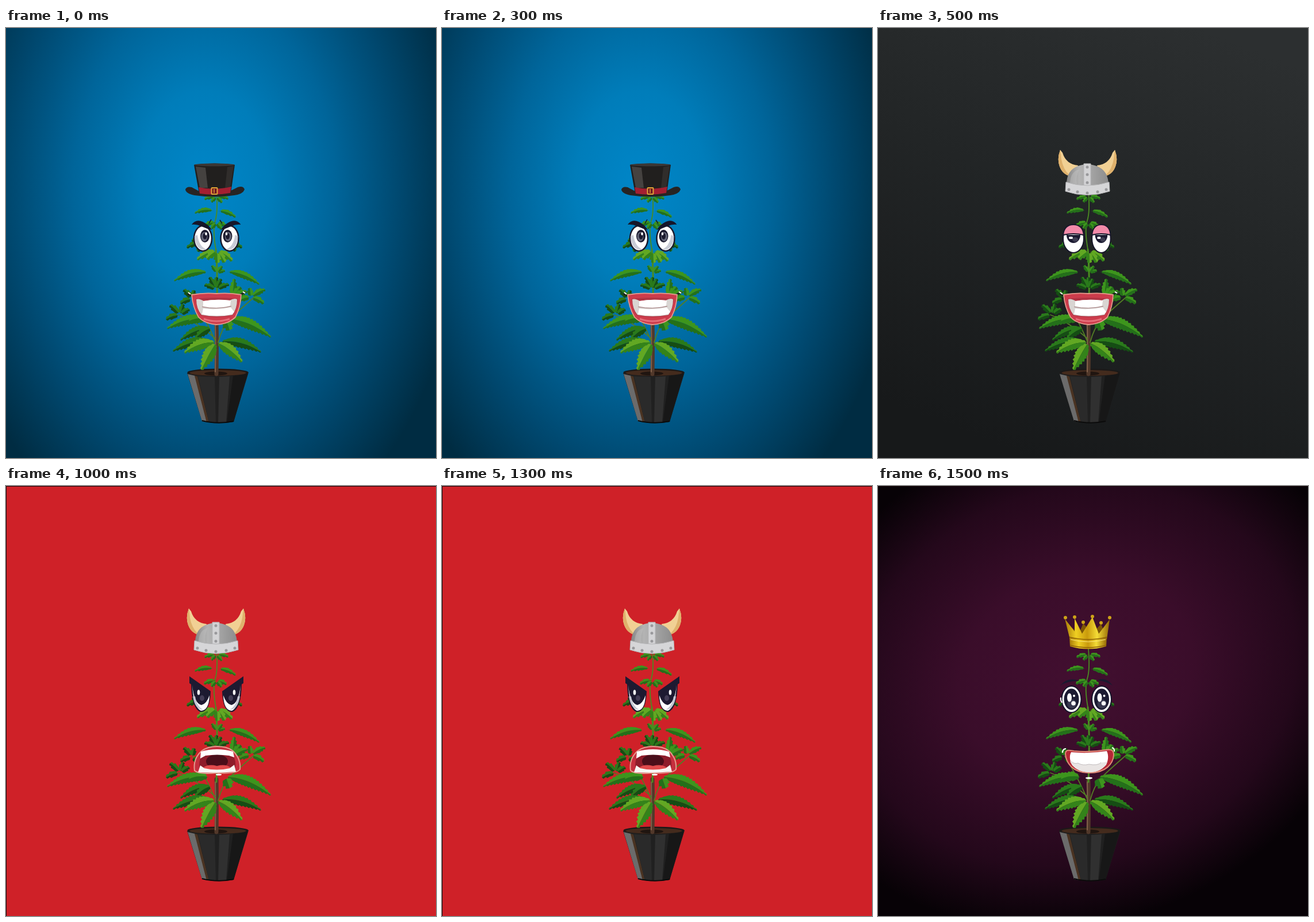
Animation of 748x748 px, one loop 2 s. Source, as an HTML page:

```html
<!DOCTYPE html>
<html lang="en">
<head>
<meta charset="utf-8">
<title>Plant with changing faces</title>
<style>
  html, body { margin: 0; width: 100%; height: 100%; overflow: hidden; background: #000; }
  svg { display: block; width: 748px; height: 748px; }
  [data-scenes] { visibility: hidden; }
  [data-scenes].on { visibility: visible; }
</style>
</head>
<body>
<svg viewBox="0 0 748 748">
  <defs>
    <radialGradient id="blue" gradientUnits="userSpaceOnUse" cx="0" cy="0" r="1" gradientTransform="translate(345 275) scale(455 660)">
      <stop offset="0" stop-color="#0086c8"/><stop offset=".25" stop-color="#007dba"/>
      <stop offset=".5" stop-color="#00659a"/><stop offset=".75" stop-color="#00486f"/>
      <stop offset="1" stop-color="#002c42"/>
    </radialGradient>
    <linearGradient id="slate" x1=".75" y1="0" x2=".35" y2="1">
      <stop offset="0" stop-color="#2c2f30"/><stop offset=".45" stop-color="#222526"/><stop offset="1" stop-color="#17191a"/>
    </linearGradient>
    <radialGradient id="plum" gradientUnits="userSpaceOnUse" cx="0" cy="0" r="1" gradientTransform="translate(345 330) rotate(-20) scale(520 430)">
      <stop offset="0" stop-color="#420f30"/><stop offset=".4" stop-color="#3a0d2a"/>
      <stop offset=".75" stop-color="#24081b"/><stop offset="1" stop-color="#070206"/>
    </radialGradient>
    <linearGradient id="gold">
      <stop offset="0" stop-color="#a87a08"/><stop offset=".25" stop-color="#efcf22"/><stop offset=".5" stop-color="#c99a0c"/>
      <stop offset=".72" stop-color="#f4dc36"/><stop offset="1" stop-color="#946806"/>
    </linearGradient>
    <linearGradient id="steel">
      <stop offset="0" stop-color="#858585"/><stop offset=".3" stop-color="#b4b4b4"/><stop offset="1" stop-color="#8c8c8c"/>
    </linearGradient>
  </defs>

  <rect data-scenes="0" width="748" height="748" fill="url(#blue)"/>
  <rect data-scenes="1" width="748" height="748" fill="url(#slate)"/>
  <rect data-scenes="2" width="748" height="748" fill="#cf2128"/>
  <rect data-scenes="3" width="748" height="748" fill="url(#plum)"/>
  <path data-scenes="23" d="M0 .5H748M.5 0V748" stroke="#160508"/>

  <g id="pot">
    <path d="M315 600L341 684Q368 690 396 685L422 599Z" fill="#202020"/>
    <path d="M316 602L329 605 351 686 341 684Z" fill="#6b6b6b"/>
    <path d="M328 605L333 606 353 686 349 686Z" fill="#4a3322"/>
    <path d="M334 606L363 607 365 687 353 686Z" fill="#2a2a2a"/>
    <path d="M371 607L389 606 383 686 369 687Z" fill="#303030"/>
    <path d="M395 605L421 600 396 685 384 686Z" fill="#171717"/>
    <path d="M341 683Q368 690 396 684" fill="none" stroke="#0b0b0b" stroke-width="2"/>
    <ellipse cx="368.500" cy="599" rx="53" ry="6.500" fill="#1c1918"/>
    <ellipse cx="368.500" cy="600" rx="49" ry="5" fill="#442b1d"/>
    <ellipse cx="365" cy="601" rx="20" ry="3.500" fill="#201510"/>
  </g>
  <g id="stems" fill="none" stroke-linecap="round">
    <path d="M366 602Q367 550 366 510" stroke="#51382a" stroke-width="7"/>
    <path d="M364 598Q365 550 364 515" stroke="#80604a" stroke-width="2"/>
    <path d="M366 515Q369 430 365 385" stroke="#4b8c22" stroke-width="3"/>
    <path d="M365 385Q359 350 364 335T366 283" stroke="#4b8c22" stroke-width="1.800"/>
    <path d="M369 547Q376 520 390 506T432 468M364 545Q352 515 325 470M364 540Q330 510 300 499" stroke="#537d25" stroke-width="1.800"/>
  </g>
  <g id="leaves"></g>

  <!-- top hat -->
  <g data-scenes="0">
    <path d="M327 238L336 288Q364 294 391 288L398 238Q363 233 327 238Z" fill="#211f1e"/>
    <path d="M330 241L347 243 351 278 337 278Z" fill="#454240"/>
    <path d="M385 242L396 240 390 278 381 279Z" fill="#302d2b"/>
    <ellipse cx="362.500" cy="238" rx="35" ry="2.500" fill="#3b3735"/>
    <path d="M312 281Q314 275 323 277L336 284Q364 291 391 283L403 277Q413 274 415 281 412 289 397 291 364 296 328 291 313 288 312 281Z" fill="#272423"/>
    <path d="M335 277Q363 283 392 276L390 287Q363 292 337 288Z" fill="#a31f31"/>
    <rect x="357.500" y="278" width="10" height="11" rx="1" fill="#6f1522" stroke="#dfa436" stroke-width="2"/>
    <path d="M362 280V287" stroke="#dfa436" stroke-width="1.500"/>
  </g>

  <!-- horned helmet -->
  <g data-scenes="12" id="helmet">
    <g id="horn">
      <path d="M317 212Q311 228 316 241 321 255 335 258 346 251 348 239 327 237 321 217Z" fill="#f1d094"/>
      <path d="M317 212Q311 228 316 241 321 255 335 258 322 247 319 228Z" fill="#dfb16c"/>
    </g>
    <use href="#horn" transform="matrix(-1 0 0 1 729 0)"/>
    <path d="M328 274Q327 239 364 237 401 239 401 274Z" fill="url(#steel)"/>
    <path d="M334 270Q335 249 350 246 344 257 346 272Z" fill="#c0c0c0" opacity=".5"/>
    <path d="M358 236H370V280H358Z" fill="#d3d3d5" stroke="#b5b5b7"/>
    <path d="M327 268Q364 280 402 268L403 284Q364 297 326 284Z" fill="#d6d6d8" stroke="#b5b5b7"/>
    <g fill="#99999c" id="rivets"></g>
  </g>

  <!-- crown -->
  <g data-scenes="3">
    <path d="M335 265L331 240 349 258 357 239 373 256 388 240 398 265Z" fill="#7d5606"/>
    <path d="M334 267L325 231 342 253 342 230 355 257 373 228 384 257 403 232 398 267Z" fill="url(#gold)"/>
    <path d="M333 262Q366 270 398 262L397 279Q366 288 334 279Z" fill="url(#gold)"/>
    <path d="M333 263Q366 271 398 263M334 277Q366 285 397 277" fill="none" stroke="#8f6207" stroke-width="1.300"/>
    <path d="M335 267Q366 275 396 267" fill="none" stroke="#ffe87a"/>
    <g id="beads" fill="#cda318"></g>
  </g>

  <!-- glaring eyes -->
  <g data-scenes="0">
    <g id="glare">
      <ellipse cx="342.500" cy="366" rx="15.500" ry="22" fill="#fff" stroke="#1b1a2e" stroke-width="2.500"/>
      <path d="M328 362Q330 389 349 385 336 381 333 360Z" fill="#c9ccd6"/>
      <ellipse cx="346" cy="362" rx="8" ry="11" fill="#1b1a2e"/>
      <ellipse cx="345" cy="363" rx="5.500" ry="8" fill="#656779"/>
      <ellipse cx="346" cy="362" rx="3.500" ry="5.500" fill="#1b1a2e"/>
      <ellipse cx="348" cy="358" rx="1.800" ry="2.800" fill="#fff"/>
      <path d="M323 342Q330 332 342 337 351 341 358 351 348 349 340 345 331 341 323 342Z" fill="#16162a"/>
    </g>
    <use href="#glare" transform="matrix(-1 0 0 1 731.500 0)"/>
    <path d="M353 340L357 333M376 340L372 334" stroke="#16162a" stroke-width="1.500"/>
  </g>

  <!-- sleepy eyes -->
  <g data-scenes="1">
    <g id="sleepy">
      <ellipse cx="340" cy="366.500" rx="18" ry="24.500" fill="#fff" stroke="#17172a" stroke-width="2"/>
      <path d="M328 360A12 14 0 0 0 352 360Z" fill="#1a1930"/>
      <ellipse cx="343" cy="368" rx="5" ry="4" fill="#3d3c51"/>
      <rect x="332" y="363" width="7" height="4" rx="2" fill="#fff"/>
      <path d="M322 360Q324 342 340 342T358 360Q340 356 322 360Z" fill="#f28aa9" stroke="#17172a" stroke-width="2"/>
    </g>
    <use href="#sleepy" transform="translate(82.400 0) scale(.9 1)"/>
  </g>

  <!-- furious eyes -->
  <g data-scenes="2">
    <g id="fury">
      <path d="M319 331L356 357Q355 394 338 393 323 387 322 345L319 343Z" fill="#1d1a31"/>
      <path d="M324 346Q327 378 340 381 349 379 354 364 353 391 339 391 326 385 324 346Z" fill="#fff"/>
      <path d="M325 366Q329 390 343 389 332 384 329 366Z" fill="#c5c7d3"/>
      <ellipse cx="341" cy="369" rx="4" ry="5" fill="#423c55"/>
      <ellipse cx="335" cy="359" rx="2.300" ry="4.500" fill="#fff"/>
    </g>
    <use href="#fury" transform="matrix(-1 0 0 1 732 0)"/>
  </g>

  <!-- sparkling eyes -->
  <g data-scenes="3">
    <g id="sparkle">
      <ellipse cx="336.500" cy="371" rx="17" ry="23" fill="#fff" stroke="#15152a" stroke-width="2"/>
      <ellipse cx="336.500" cy="371" rx="13" ry="18.500" fill="#1b1b32"/>
      <ellipse cx="337" cy="379" rx="8" ry="8" fill="#38384f"/>
      <ellipse cx="333" cy="368" rx="4" ry="7.500" fill="#fff"/>
      <circle cx="340" cy="378" r="3.800" fill="#fff"/>
      <circle cx="341" cy="365" r="2" fill="#fff"/>
    </g>
    <use href="#sparkle" x="52.500"/>
    <path d="M317 347Q331 331 350 339 330 339 317 347ZM382 338Q396 331 408 347 397 340 382 338Z" fill="#1b1a30"/>
    <path d="M318 368Q317 372 320 377" fill="none" stroke="#fff" stroke-width="2"/>
  </g>

  <!-- grin -->
  <g data-scenes="01">
    <path d="M316 462L322 466M408 464L416 459" stroke="#1a241a" stroke-width="3"/>
    <path d="M317 460L321 463M412 459L416 461" stroke="#fff" stroke-width="2"/>
    <path d="M323 464Q345 460 366 462 388 460 409 464 408 486 399 503 387 515 366 516 345 514 335 503 325 486 323 464Z" fill="#cd3c4c" stroke="#e59a8c" stroke-width="1.800"/>
    <path d="M330 471Q366 467 403 471 403 488 394 500 366 506 339 500 330 488 330 471Z" fill="#b03443"/>
    <path d="M331 472Q336 470 344 475 366 471 389 474 397 469 402 472 402 488 394 499 366 504 340 499 331 488 331 472Z" fill="#d9d5d2"/>
    <path d="M343 475Q366 471 391 474L390 483Q366 490 343 484ZM343 488Q366 491 391 486L397 494 393 498Q366 503 341 498Z" fill="#fff"/>
    <path d="M341 485Q366 490 392 484" fill="none" stroke="#a2777a"/>
    <path d="M344 506Q366 514 389 506" fill="none" stroke="#e56d78" stroke-width="3"/>
  </g>

  <!-- roar -->
  <g data-scenes="2">
    <path d="M328 495Q325 475 340 461 351 453 367 453 385 453 395 461 409 475 407 493 401 501 367 499 335 502 328 495Z" fill="#c52f3e" stroke="#e39a8d" stroke-width="2"/>
    <path d="M342 466Q367 458 393 466 402 478 398 493 367 496 337 493 334 478 342 466Z" fill="#8e1c2a"/>
    <ellipse cx="367" cy="479" rx="19" ry="12" fill="#4a0e1a"/>
    <path d="M343 490Q352 483 367 487 382 483 391 490L387 496H347Z" fill="#e04a4c"/>
    <path d="M339 462Q367 454 395 462L397 472 388 469Q367 466 347 469L338 474Z" fill="#fff"/>
    <path d="M334 498L338 486 345 491Q367 496 389 491L397 485 400 497Q367 500 334 498Z" fill="#f8f7f4"/>
    <ellipse cx="370" cy="502" rx="5" ry="1.500" fill="#fff"/>
  </g>

  <!-- toothy smile -->
  <g data-scenes="3">
    <path d="M321 464Q321 457 327 457M407 455Q412 457 411 462" fill="none" stroke="#fff" stroke-width="2"/>
    <path d="M326 466C326 457 334 460 341 461Q367 464 396 459C406 457 410 460 410 468 409 483 397 499 367 499 339 499 327 482 326 466Z" fill="#b52736" stroke="#e08b78" stroke-width="2"/>
    <path d="M336 463Q367 466 398 461C402 470 400 478 397 485Q385 498 367 498 349 498 338 486C334 479 332 470 336 463Z" fill="#fff"/>
    <path d="M334 479Q341 484 348 482 356 487 367 484 382 487 388 481L399 480Q391 498 367 498 343 497 334 479Z" fill="#e9e5e4"/>
    <path d="M336 479Q341 484 348 482 356 487 367 484 382 487 388 481" fill="none" stroke="#c2bcbe"/>
    <ellipse cx="367" cy="508" rx="6" ry="1.800" fill="#fff"/>
  </g>
</svg>

<script>
const byId = id => document.getElementById(id);
const tones = { light: ['#62a823', '#34831a'], mid: ['#3d951d', '#24701a'], dark: ['#2a7a1b', '#154d14'] };

// Serrated leaf, arched slightly upward, with a darker lower half.
function leaf(x, y, tipX, tipY, width, tone) {
  const dx = tipX - x, dy = tipY - y, length = Math.hypot(dx, dy);
  const steps = Math.max(4, Math.round(length / 6));
  const at = (t, offset) => {
    const arch = Math.abs(dx) * .4 * t * (1 - t);
    return `${(x + dx * t - dy / length * offset).toFixed(1)} ${(y + dy * t - arch + dx / length * offset).toFixed(1)}`;
  };
  const half = (side, color) => {
    const outer = [], spine = [];
    for (let i = 0; i <= steps; i++) {
      const t = i / steps, w = side * width * 1.15 * Math.sin(Math.PI * t ** .85);
      outer.push(at(t, w * .82), at(Math.min(1, t + .7 / steps), w));
      spine.unshift(at(t, 0));
    }
    return `<path d="M${outer.join('L')}L${spine.join('L')}Z" fill="${color}"/>`;
  };
  const upper = dx < 0 ? 1 : -1;
  return half(upper, tones[tone][0]) + half(-upper, tones[tone][1]);
}

// Leaves sharing one base; tips are x, y pairs.
function fan(x, y, width, tone, ...tips) {
  let out = '';
  for (let i = 0; i < tips.length; i += 2) out += leaf(x, y, tips[i], tips[i + 1], width, tone);
  return out;
}

byId('leaves').innerHTML = [
  fan(366, 294, 3.5, 'mid', 345, 298, 387, 297, 357, 303, 376, 304),
  fan(362, 318, 4, 'mid', 328, 322),
  fan(369, 318, 4, 'mid', 400, 329),
  fan(366, 339, 4, 'mid', 344, 344, 384, 345, 357, 349, 375, 350),
  fan(345, 374, 5, 'dark', 314, 382, 323, 369, 333, 389),
  fan(385, 374, 5, 'dark', 411, 382, 400, 388),
  fan(367, 388, 6, 'light', 332, 403, 394, 405, 349, 402, 381, 408, 368, 409),
  fan(352, 425, 6, 'mid', 292, 440),
  fan(385, 424, 6, 'mid', 441, 446),
  fan(367, 427, 3.5, 'mid', 358, 413, 381, 422, 376, 414),
  fan(366, 456, 4.5, 'dark', 354, 433, 366, 433, 374, 436, 345, 447, 388, 446),
  fan(394, 472, 6, 'mid', 397, 436, 408, 450, 419, 458),
  fan(324, 472, 5, 'dark', 303, 479, 309, 455, 327, 456, 335, 481),
  fan(426, 469, 5, 'mid', 451, 455, 449, 479, 424, 452, 406, 474),
  fan(303, 500, 5, 'dark', 285, 482, 308, 480, 278, 507, 319, 489),
  fan(354, 507, 8, 'mid', 280, 523, 318, 510),
  fan(382, 506, 9, 'mid', 461, 538, 389, 526),
  fan(358, 522, 7, 'dark', 303, 543, 329, 540),
  fan(372, 546, 8, 'dark', 444, 564),
  fan(360, 546, 8, 'dark', 290, 562),
  fan(366, 547, 9, 'light', 310, 565, 411, 581),
  fan(366, 547, 10, 'light', 340, 595)
].join('');

const dots = (id, radius, points) => {
  byId(id).innerHTML = points.map(([x, y]) => `<circle cx="${x}" cy="${y}" r="${radius}"/>`).join('');
};
dots('rivets', 2.5, [[332, 281], [347, 285], [364, 287], [382, 285], [397, 281], [364, 242], [364, 255], [364, 269]]);
dots('beads', 3, [[326, 229], [342, 228], [357, 237], [373, 227], [388, 238], [403, 229]]);

const parts = document.querySelectorAll('[data-scenes]');
function draw(now) {
  const scene = Math.floor(now % 2000 / 500);
  for (const part of parts) part.classList.toggle('on', part.dataset.scenes.includes(scene));
  byId('helmet').setAttribute('transform', scene === 2 ? 'translate(1 1)' : '');
  requestAnimationFrame(draw);
}
draw(performance.now());
</script>
</body>
</html>
```
